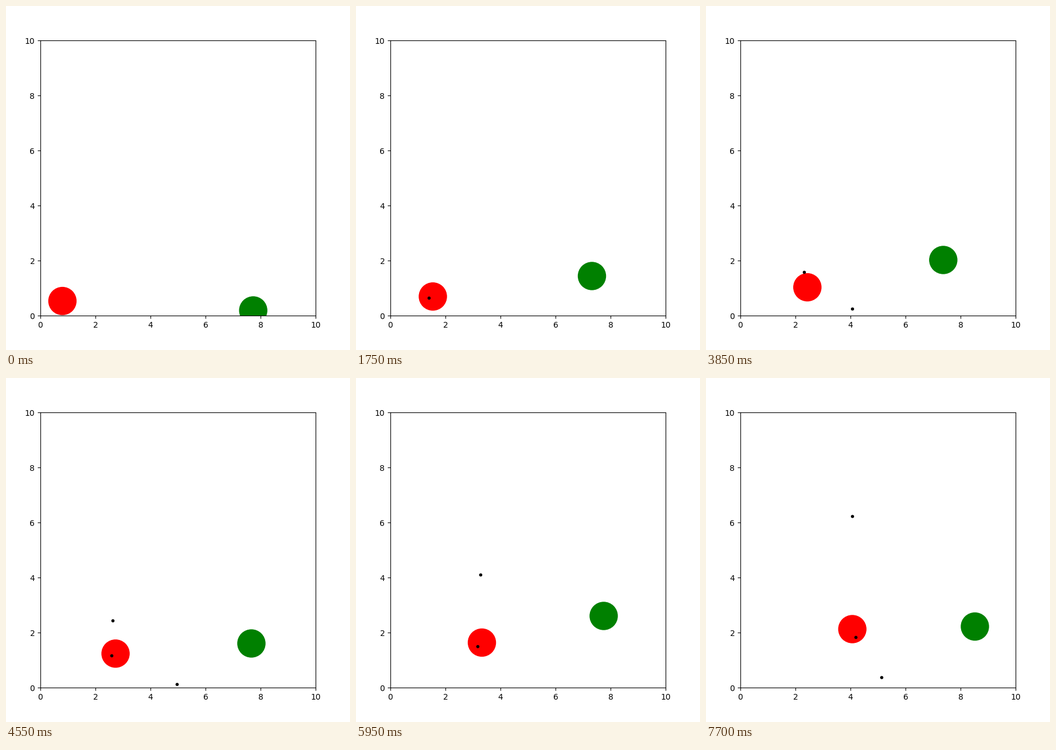
Write a matplotlib script that moves like this. It is 600 px wide and 600 px high and loops after 8 s.

```python
import numpy as np
import matplotlib.pyplot as plt
from matplotlib.animation import FuncAnimation
from matplotlib.patches import Circle

LOOP, TICK, HOLD = 8000, 50, 350  # ms
RADIUS = 0.5
RED_START, RED_SPEED = 0.8, 0.1485

# Turning points: (step, y) for red, (step, x, y) for green.
RED_TURNS = [(0, .53), (2, .525), (6, .75), (9, .745),
             (12, 1.171), (15, 1.365), (19, 1.906), (22, 2.125)]
GREEN_TURNS = [(0, 7.733, .188), (3, 7.375, .938), (5, 7.323, 1.438),
               (9, 7.077, 2.438), (13, 7.667, 1.604), (15, 8.083, 2.104),
               (17, 7.75, 2.604), (19, 8.0, 2.302), (22, 8.521, 2.219)]

# Red fires at a steady rate, each time in a new direction.
FIRST_SHOT, SHOT_EVERY, SHOT_SPEED = 5, 4, 0.45
HEADINGS = np.radians([-8.3, 69.3, -48.1, -30, -19.2])


def follow(turns, step):
    steps, *axes = zip(*turns)
    return [np.interp(step, steps, values) for values in axes]


def red_pos(step):
    return RED_START + RED_SPEED * step, *follow(RED_TURNS, step)


def shots(step):
    """Positions of the shots still in flight."""
    for k, heading in enumerate(HEADINGS):
        age = step - FIRST_SHOT - SHOT_EVERY * k
        if age < 0:
            break
        x, y = red_pos(step - age - 1)
        x += SHOT_SPEED * age * np.cos(heading)
        y += SHOT_SPEED * age * np.sin(heading)
        if y >= 0:
            yield x, y


fig = plt.figure(figsize=(6, 6), dpi=100)
ax = fig.add_axes([.1, .1, .8, .8])
ax.set(xlim=(0, 10), ylim=(0, 10))

red = ax.add_patch(Circle((0, 0), RADIUS, color="red"))
green = ax.add_patch(Circle((0, 0), RADIUS, color="green"))
dots, = ax.plot([], [], "k.")


def update(i):
    step = i * TICK // HOLD
    red.center = red_pos(step)
    green.center = follow(GREEN_TURNS, step)
    dots.set_data(np.reshape(list(shots(step)), (-1, 2)).T)
    return red, green, dots


anim = FuncAnimation(fig, update, frames=LOOP // TICK, interval=TICK,
                     repeat=True, repeat_delay=0)
plt.show()
```
